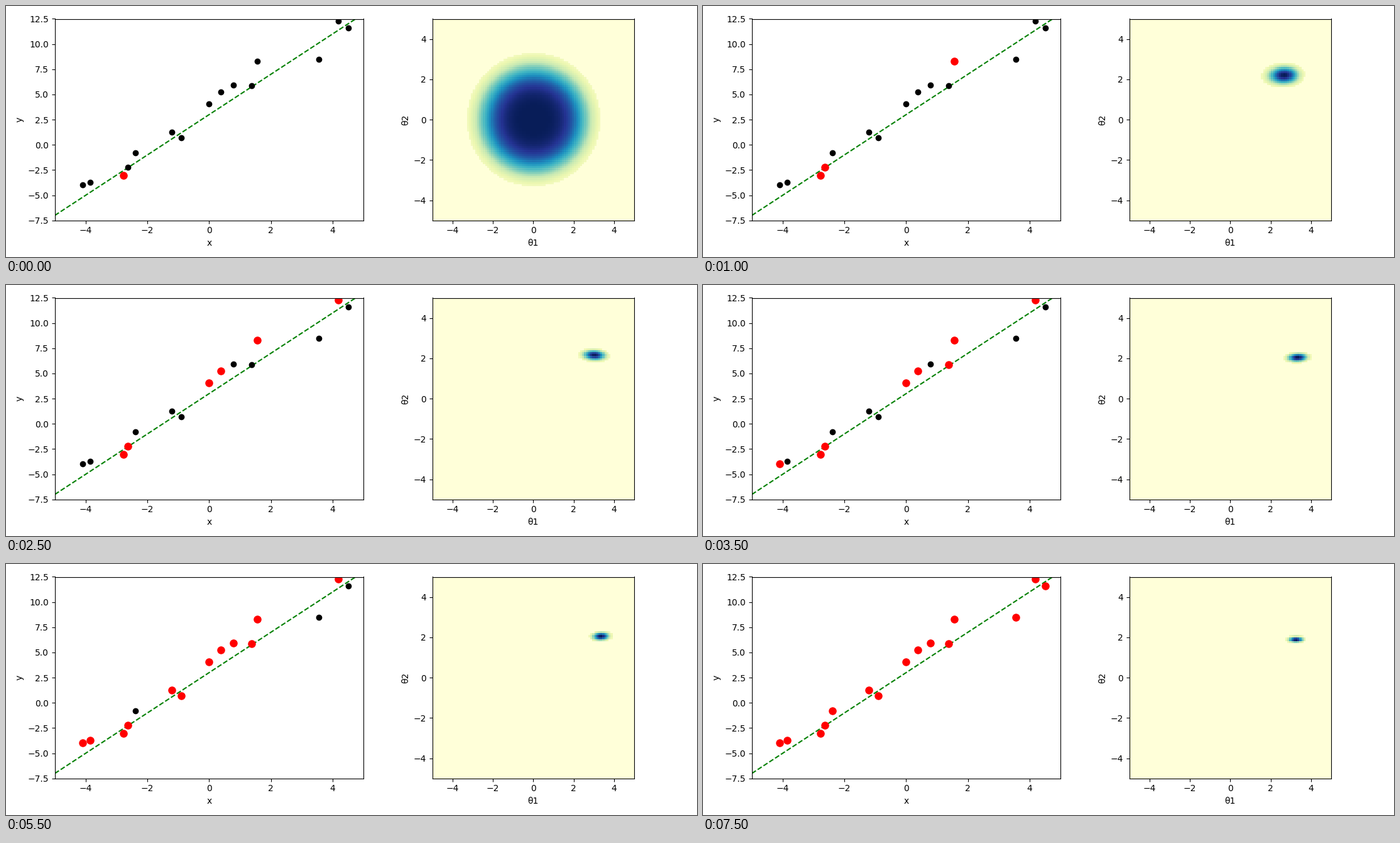
Recreate the animation shown at these times as a matplotlib script. Size 1100x400 px, loop 8 s.

```python
import numpy as np
import matplotlib.pyplot as plt
from matplotlib.animation import FuncAnimation

W, H, DPI = 1100, 400, 100
STEPS, STEP_MS = 16, 500
LIMIT = 5
FAINT = 0.085  # shades below this vanish into the background

plt.rcParams["font.family"] = "DejaVu Sans"

# The observations, in the order they are revealed
points = np.array([
    (-2.78, -3.05), (1.56, 8.29), (-2.63, -2.24), (0, 4.06), (4.19, 12.28),
    (0.38, 5.24), (-4.1, -3.98), (1.38, 5.86), (-0.9, 0.69), (-1.21, 1.25),
    (0.79, 5.93), (-3.85, -3.73), (3.56, 8.48), (4.51, 11.6), (-2.38, -0.8),
])
T1, T2 = np.meshgrid(*[np.linspace(-LIMIT, LIMIT, 100)] * 2)


def posterior(n):
    """Flat-topped prior times unit-noise likelihoods of the first n points."""
    log_p = -(T1**2 + T2**2)**2 / 50
    for x, y in points[:n]:
        log_p -= (y - T1 - T2 * x)**2 / 2
    shade = np.exp(log_p - log_p.max())
    return np.where(shade < FAINT, 0, shade)


fig, (ax, ax2) = plt.subplots(1, 2, figsize=(W / DPI, H / DPI), dpi=DPI)

line_x = np.linspace(-LIMIT, LIMIT, 100)
ax.plot(line_x, 3 + 2 * line_x, "g--")
ax.plot(*points.T, "ko", markersize=6)
seen, = ax.plot([], [], "ro", markersize=8)
ax.set(xlim=(-LIMIT, LIMIT), ylim=(-7.5, 12.5), xlabel="x", ylabel="y")

heat = ax2.imshow(posterior(0), cmap="YlGnBu", vmin=0, vmax=1, origin="lower",
                  extent=(-LIMIT, LIMIT, -LIMIT, LIMIT), interpolation="nearest")
ax2.set(xlabel="θ1", ylabel="θ2")
fig.tight_layout()


def update(step):
    seen.set_data(*points[:step + 1].T)
    heat.set_data(posterior(step))
    return seen, heat


anim = FuncAnimation(fig, update, frames=STEPS, interval=STEP_MS,
                     repeat=True, repeat_delay=0)
plt.show()
```
